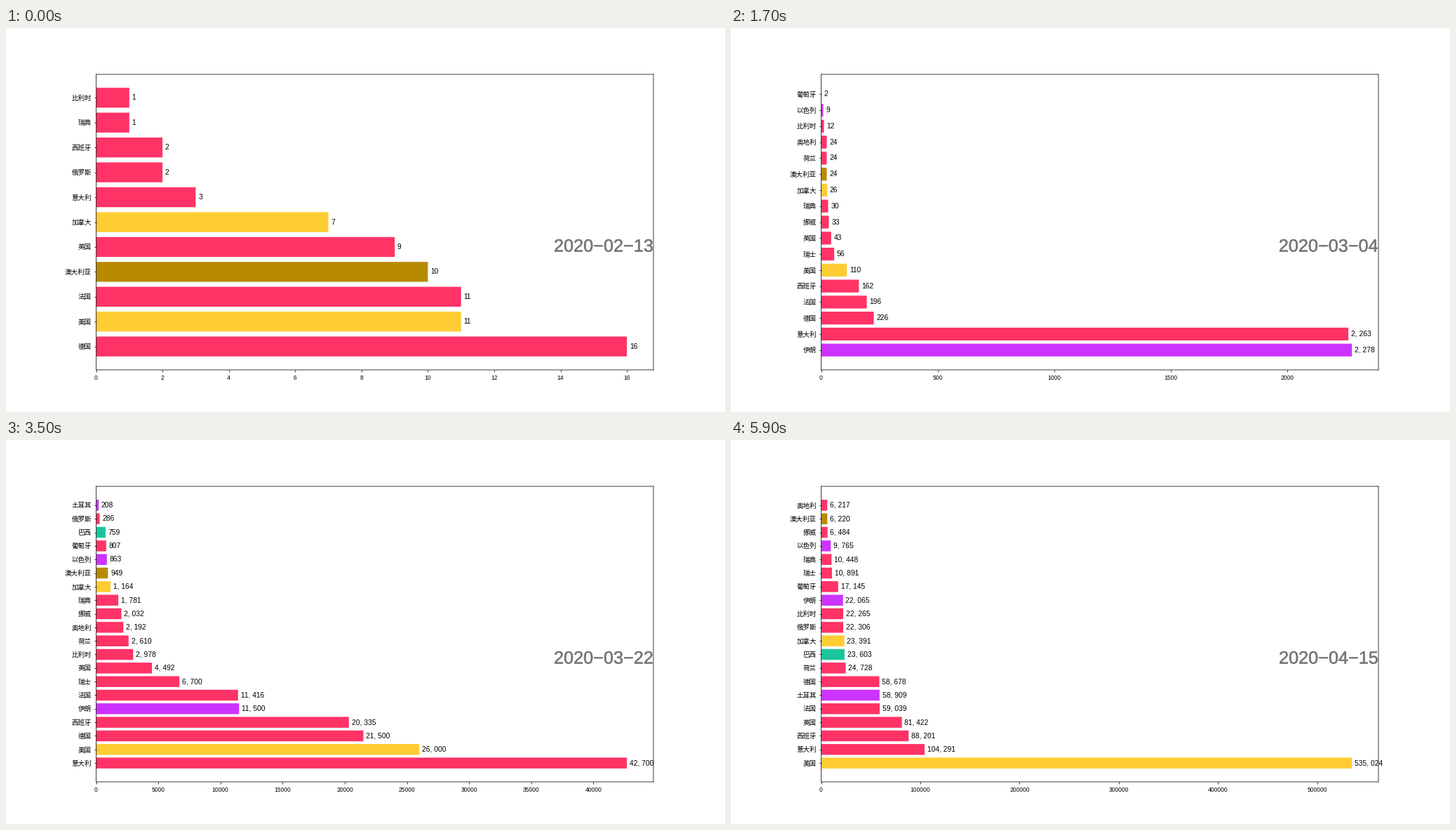
Animation of 1025 by 547 pixels, one loop 6000 ms. Source, as a matplotlib script:

```python
import matplotlib.pyplot as plt
import numpy as np
from matplotlib.animation import FuncAnimation
from matplotlib.patheffects import withStroke

WIDTH, HEIGHT, DPI = 1025, 547, 547 / 8
LEFT, RIGHT, TOP, BOTTOM = 128.5, 923, 66, 487
FRAMES, INTERVAL = 60, 100
FIRST_DATE = np.datetime64("2020-02-13")
DROPOUT_DAY = 5

EUROPE, NORTH_AMERICA, OCEANIA = "#ff3366", "#ffcc33", "#b88a00"
ASIA, SOUTH_AMERICA = "#cc33ff", "#1bc59d"
GREY = "#777777"

# Counts on these days; the days between grow geometrically.
KEY_DAYS = (0, 10, 20, 31, 45, 56, 62)
NA = None

# name, colour, day of (re)appearance, counts on the key days
COUNTRIES = [
    ("德国", EUROPE, NA, (16, 9, 226, 4843, 49146, 56169, 58678)),
    ("美国", NORTH_AMERICA, NA, (11, 32, 110, 2815, 121379, 393536, 535024)),
    ("法国", EUROPE, 12, (11, NA, 196, 4409, 29561, 50466, 59039)),
    ("澳大利亚", OCEANIA, NA, (10, 10, 24, 245, 3674, 5883, 6220)),
    ("英国", EUROPE, 11, (9, NA, 43, 1111, 18159, 53501, 81422)),
    ("加拿大", NORTH_AMERICA, 11, (7, NA, 26, 248, 5459, 16074, 23391)),
    ("意大利", EUROPE, NA, (3, 114, 2263, 18277, 70644, 95727, 104291)),
    ("俄罗斯", EUROPE, 24, (2, NA, NA, 56, 1462, 9357, 22306)),
    ("西班牙", EUROPE, 12, (2, NA, 162, 6894, 59984, 89187, 88201)),
    ("瑞典", EUROPE, 13, (1, NA, 30, 953, 3328, 7715, 10448)),
    ("比利时", EUROPE, 16, (1, NA, 12, 882, 10055, 19588, 22265)),
    ("伊朗", ASIA, 7, (NA, 35, 2278, 8686, 23278, 33471, 22065)),
    ("以色列", ASIA, 9, (NA, 1, 9, 198, 3764, 8906, 9765)),
    ("瑞士", EUROPE, 12, (NA, NA, 56, 1182, 12549, 13018, 10891)),
    ("挪威", EUROPE, 14, (NA, NA, 33, 1043, 3959, 5912, 6484)),
    ("荷兰", EUROPE, 15, (NA, NA, 24, 954, 7141, 16412, 24728)),
    ("奥地利", EUROPE, 12, (NA, NA, 24, 648, 7414, 10102, 6217)),
    ("葡萄牙", EUROPE, 18, (NA, NA, 2, 112, 5821, 12621, 17145)),
    ("巴西", SOUTH_AMERICA, 23, (NA, NA, NA, 151, 3812, 15127, 23603)),
    ("土耳其", ASIA, 28, (NA, NA, NA, 6, 7224, 35568, 58909)),
]

# Extra turning points where growth is far from geometric.
TURNS = {
    "美国": {38: 26000, 51: 257000, 59: 477400},
    "意大利": {7: 3, 38: 42700},
    "伊朗": {38: 11500, 51: 32500},
    "德国": {38: 21500, 51: 68000},
    "瑞士": {38: 6700, 50: 13900},
}


def build_marks(name, start, counts):
    marks = dict(zip(KEY_DAYS, counts)) | TURNS.get(name, {})
    if start is not None:
        marks |= {DROPOUT_DAY: None, start: 1}
    return marks


def count_at(marks, day):
    """Count on a day, or None while the country is not listed."""
    before = max(d for d in marks if d <= day)
    low = marks[before]
    if low is None or before == day:
        return low
    after = min(d for d in marks if d > day)
    high = marks[after]
    if high is None:
        return low
    return round(low * (high / low) ** ((day - before) / (after - before)))


SERIES = [(name, color, build_marks(name, start, counts))
          for name, color, start, counts in COUNTRIES]

plt.rcParams.update({
    "font.family": "Liberation Sans",
    "xtick.labelsize": 9,
    "ytick.labelsize": 10,
})
fig, ax = plt.subplots(figsize=(WIDTH / DPI, HEIGHT / DPI), dpi=DPI)
fig.subplots_adjust(left=LEFT / WIDTH, right=RIGHT / WIDTH,
                    top=1 - TOP / HEIGHT, bottom=1 - BOTTOM / HEIGHT)


def draw(frame):
    # The log has no entries for three days after the first five.
    day = frame if frame < 5 else frame + 3
    listed = [(name, color, count_at(marks, day)) for name, color, marks in SERIES]
    listed = [row for row in listed if row[2] is not None]
    listed.sort(key=lambda row: -row[2])
    names, colors, counts = zip(*listed)
    rows = range(len(names))

    ax.clear()
    ax.barh(rows, counts, color=colors, snap=False)
    ax.set_yticks(rows, names, fontfamily="Noto Sans CJK JP")
    for spine in ax.spines.values():
        spine.set_snap(False)
    gap = counts[0] * 0.005
    for row, count in zip(rows, counts):
        ax.text(count + gap, row, f"{count:,}".replace(",", ", "),
                size=10.8, ha="left", va="center")
    date = str(FIRST_DATE + day).replace("-", "\u2212")
    ax.text(1, 0.4, date, transform=ax.transAxes, color=GREY,
            size=26.6, ha="right", va="baseline",
            path_effects=[withStroke(linewidth=0.5, foreground=GREY)])


animation = FuncAnimation(fig, draw, frames=FRAMES, interval=INTERVAL,
                          repeat=True, repeat_delay=0)
plt.show()
```
